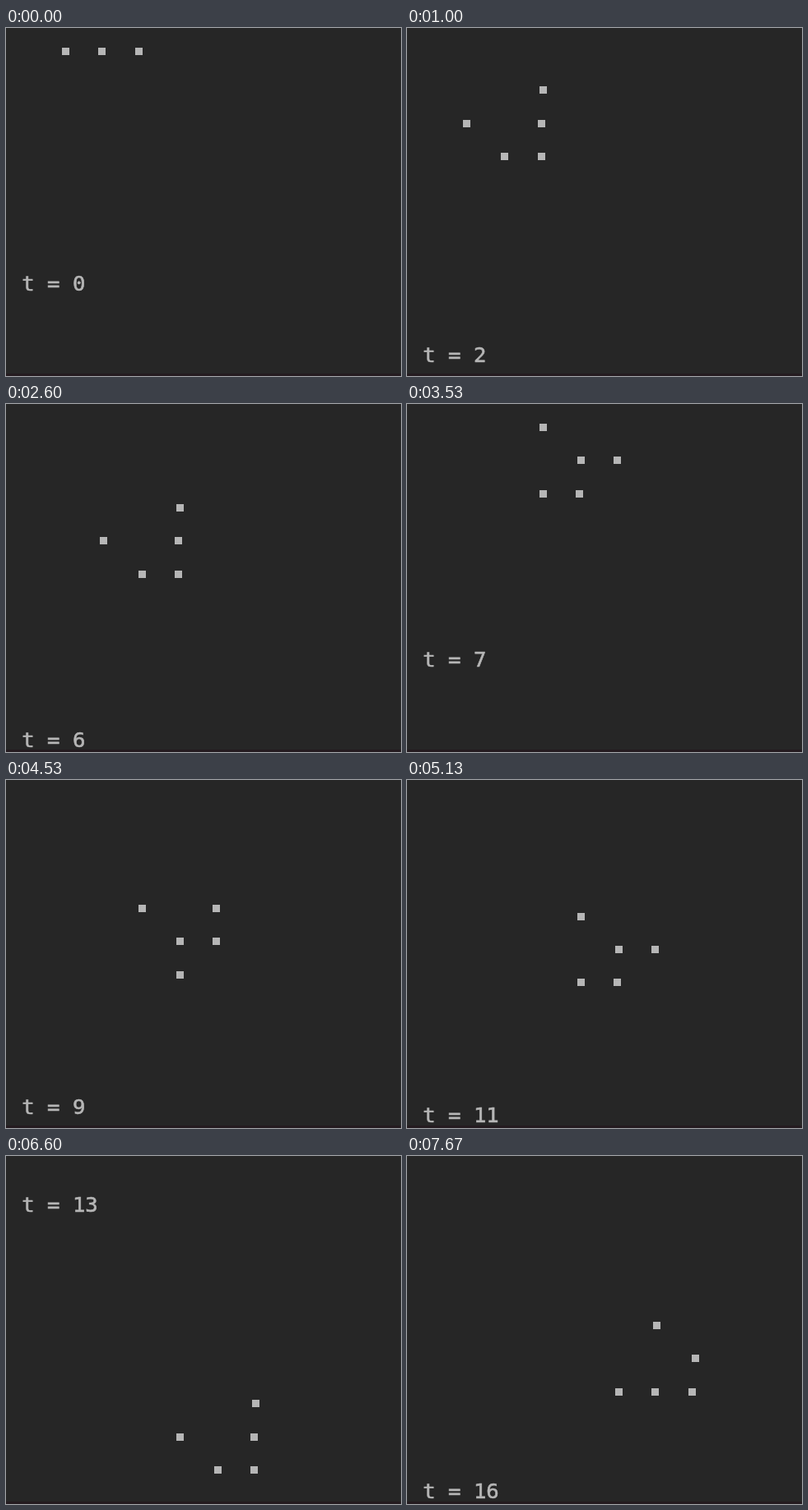
An HTML page with a canvas that plays this animation: 480 px wide and 424 px high, repeating every 8 s.

```html
<!DOCTYPE html>
<html>
<head>
<meta charset="utf-8">
<title>Glider</title>
<style>
html, body { margin: 0; width: 100%; height: 100%; overflow: hidden; background: #262626; }
canvas { display: block; }
</style>
</head>
<body>
<canvas id="stage" width="480" height="424"></canvas>
<script>
const ctx = document.getElementById('stage').getContext('2d');
const LOOP = 8000, TICK = 1000 / 15;                  // ms; the screen refreshes once per tick
const FIRST = -10.5, PERIOD = 504.76, SCROLL = 90.6;  // ms; when and how fast each print scrolls in
const ROW = 40.4, COL = 46.25, BLOCK = 11 * ROW, SIZE = 9;

// Game of Life on a 10 x 10 grid
function nextGen(grid) {
  const at = (r, c) => (grid[r] && grid[r][c]) || 0;
  return grid.map((line, r) => line.map((live, c) => {
    let n = -live;
    for (let i = -1; i < 2; i++)
      for (let j = -1; j < 2; j++) n += at(r + i, c + j);
    return +(n === 3 || (live && n === 2));
  }));
}

const glider = Array.from({ length: 10 }, () => Array(10).fill(0));
for (const [r, c] of [[1, 2], [2, 3], [3, 1], [3, 2], [3, 3]]) glider[r][c] = 1;
const gens = [glider];
while (gens.length <= LOOP / PERIOD + 2) gens.push(nextGen(gens[gens.length - 1]));

function drawBlock(t, top) {
  gens[t].forEach((line, r) => {
    const y = Math.round(top + 4.4 + r * ROW - SIZE / 2);
    let x = 26.4;
    for (const live of line) {
      if (live) ctx.fillRect(Math.round(x - SIZE / 2), y, SIZE, SIZE);
      x += live ? COL - 1.95 : COL; // the block glyph is slightly narrower
    }
  });
  const label = 't = ' + t, base = Math.round(top + 417);
  ctx.fillText(label, 19.3, base);
  ctx.strokeText(label, 19.3, base); // medium weight
}

function draw(ms) {
  const now = Math.floor((ms + 4) / TICK) * TICK;
  const t = Math.floor((now - FIRST) / PERIOD);
  const age = now - FIRST - t * PERIOD;
  const left = 1 - Math.min(1, age / SCROLL);
  const scroll = BLOCK * (1 - left * left); // ease out

  ctx.fillStyle = '#262626';
  ctx.fillRect(0, 0, 480, 424);
  ctx.font = '25.6px "DejaVu Sans Mono", "Noto Sans Mono", monospace';
  ctx.fillStyle = ctx.strokeStyle = '#b6b6b6';
  ctx.lineWidth = 0.6;
  drawBlock(t, -scroll);
  drawBlock(t + 1, BLOCK - scroll);
  ctx.fillStyle = '#241b20';
  ctx.fillRect(0, 421, 480, 3);
}

const begin = performance.now();
function frame() {
  draw((performance.now() - begin) % LOOP);
  requestAnimationFrame(frame);
}
frame();
</script>
</body>
</html>
```
